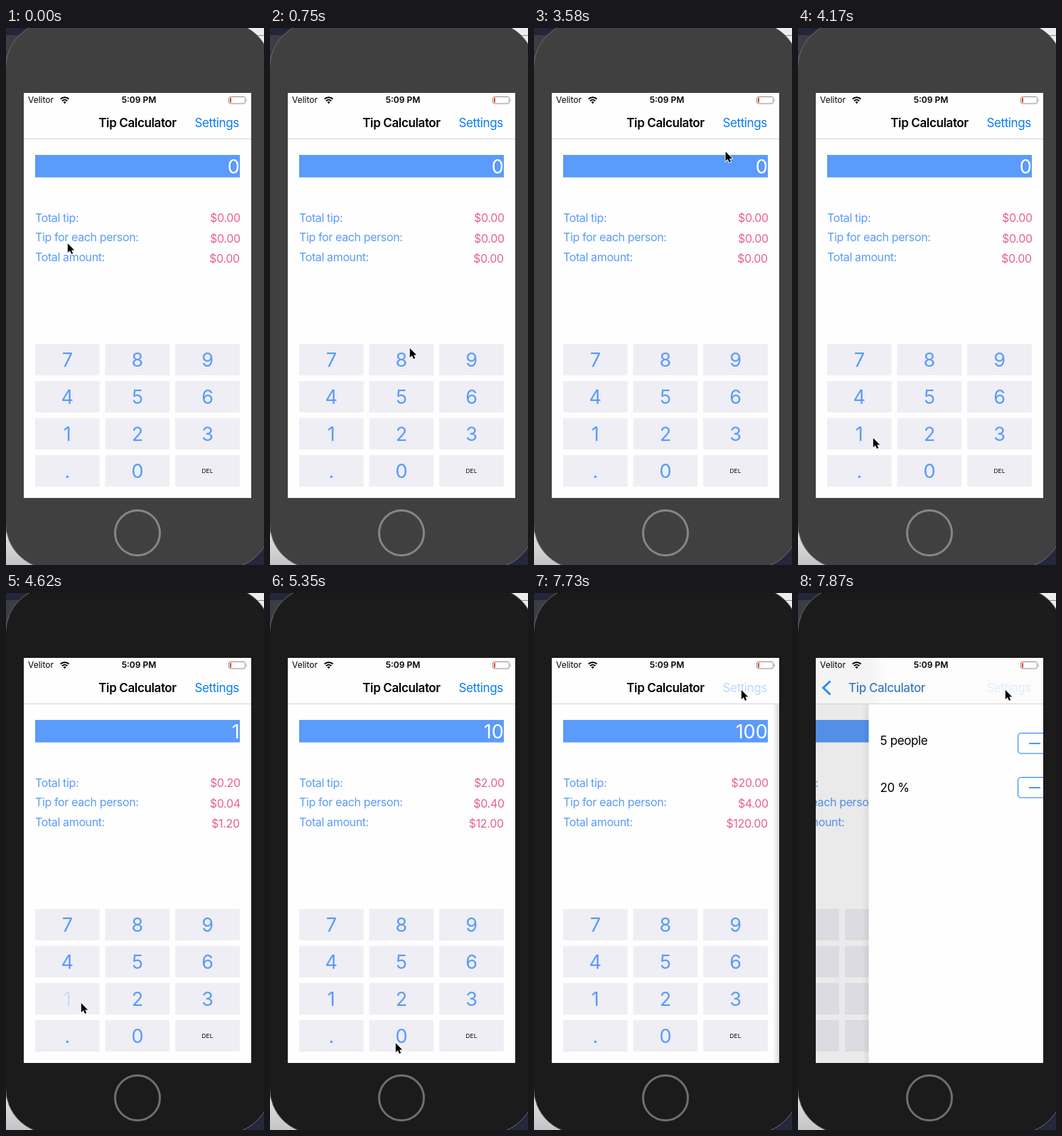
Recreate the animation shown at these times as an HTML page. Size 363x753 px, loop 8 s.

```html
<!DOCTYPE html>
<html lang="en">
<head>
<meta charset="utf-8">
<title>Tip Calculator</title>
<style>
  html, body { margin: 0; width: 100%; height: 100%; overflow: hidden; background: #2a2b3a; }
  svg { display: block; width: 363px; height: 753px; font-family: Inter, "Liberation Sans", sans-serif; }
  .nav { font-size: 17px; letter-spacing: -.38px; }
  .label { font-size: 16px; letter-spacing: -.37px; fill: #5a9bf8; }
  .sum { font-size: 16px; letter-spacing: -.33px; fill: #e6618d; text-anchor: end; }
  .digit { font-size: 27px; fill: #5a9bf8; text-anchor: middle; }
  .word { font-size: 8.2px; letter-spacing: .2px; text-anchor: middle; }
  .bold { font-weight: 600; }
  .mid { text-anchor: middle; }
  .line { fill: none; stroke: #117df8; }
</style>
</head>
<body>
<svg viewBox="0 0 363 753">
  <defs>
    <clipPath id="glass"><rect x="25" y="91" width="320" height="568"/></clipPath>
    <linearGradient id="desk" x2="0" y2="1">
      <stop offset="0" stop-color="#fafafa"/><stop offset="1" stop-color="#c4c4c4"/>
    </linearGradient>
    <linearGradient id="shade">
      <stop offset="0" stop-opacity="0"/><stop offset="1" stop-opacity=".15"/>
    </linearGradient>
    <linearGradient id="blur">
      <stop offset=".24" stop-color="#f4f4f4"/><stop offset=".3" stop-color="#fcfcfc"/>
    </linearGradient>
  </defs>

  <!-- desktop behind the phone -->
  <rect width="363" height="753" fill="#3b3c44"/>
  <rect width="180" height="10" fill="#24263a"/>
  <rect x="180" width="183" height="60" fill="#ececec"/>
  <rect x="180" y="10" width="183" height="1" fill="#8b8b8f"/>
  <rect y="670" width="180" height="83" fill="url(#desk)"/>
  <rect x="180" y="670" width="183" height="83" fill="#25273a"/>

  <rect id="body" x="-.5" y="-8" width="373" height="766" rx="64" stroke="#6c6c6e"/>
  <circle id="home" cx="185" cy="708" r="31.5" fill="none" stroke-width="3"/>

  <g clip-path="url(#glass)">
    <rect x="25" y="91" width="320" height="568" fill="#fefefe"/>

    <g id="calc">
      <rect x="41" y="178" width="288" height="31.5" fill="#5a9bfb"/>
      <text id="bill" x="328.7" y="203.5" font-size="27" fill="#fff" text-anchor="end"></text>
      <text class="label" x="41" y="271.5">Total tip:</text>
      <text class="label" x="41" y="299">Tip for each person:</text>
      <text class="label" x="41" y="326.5">Total amount:</text>
      <text class="sum" id="tip" x="329.7" y="272"></text>
      <text class="sum" id="each" x="329.7" y="301"></text>
      <text class="sum" id="total" x="328.7" y="329"></text>
      <g id="keys"></g>
    </g>
    <rect id="dim" x="25" y="155" width="320" height="504"/>

    <g id="sheet">
      <rect id="edge" x="-9" y="155" width="9" height="504" fill="url(#shade)"/>
      <rect y="155" width="320" height="504" fill="#fefefe"/>
      <text class="nav" x="16" y="213">5 people</text>
      <text class="nav" x="16" y="278.5">20 %</text>
      <g id="steppers"></g>
    </g>

    <rect x="25" y="91" width="320" height="64" fill="#fefefe"/>
    <rect id="haze" x="25" y="91" width="320" height="64" fill="url(#blur)"/>
    <rect x="25" y="155" width="320" height="1" fill="#d3d3d4"/>

    <text x="31" y="105.4" font-size="12">Velitor</text>
    <g fill="none" stroke="#000" stroke-width="2">
      <path d="M76.6 99.6a8.6 8.6 0 0 1 12 0M79 102.2a5.2 5.2 0 0 1 7.2 0"/>
      <path d="M82.6 106.2l-2-2.2a3 3 0 0 1 4 0z" fill="#000" stroke="none"/>
    </g>
    <text class="bold mid" x="187" y="105.4" font-size="12">5:09 PM</text>
    <rect x="313.5" y="96.5" width="23" height="9.5" rx="2" fill="none" stroke="#8c8c8c"/>
    <path d="M338 99.5q1.8 1.7 0 3.5z" fill="#777"/>
    <rect x="315" y="98" width="2" height="6.5" fill="#f2362f"/>

    <path id="back" d="M45.5 123.5L35.5 133L45.5 142.5" fill="none" stroke="#2c8bfa" stroke-width="3"/>
    <text class="nav mid" id="title" y="139">Tip Calculator</text>
    <text class="nav" id="settings" x="265.4" y="139" fill="#087cf6">Settings</text>
  </g>

  <path id="cursor" d="M.8 1V14L3.9 11.2L6 16L8.2 15L6.2 10.4H10.2Z" stroke="#fff" stroke-width="1.6" paint-order="stroke"/>
</svg>

<script>
const LOOP = 8000;
const STEP = 146;                  // the picture advances in steps of this length
const TAPS = [4620, 5204, 5640];   // "1", "0", "0"
const PUSH = 7723;                 // the settings sheet starts to slide in

const $ = id => document.getElementById(id);
const set = (id, attrs) => {
  for (const name in attrs) $(id).setAttribute(name, attrs[name]);
};
const stepsSince = (t, at) => Math.floor((t - at) / STEP);
const ease = p => p * p * (3 - 2 * p);

$('keys').innerHTML = [...'789456123.0', 'DEL'].map((name, i) => {
  const x = 41 + i % 3 * 98.6, y = 443 + Math.floor(i / 3) * 52;
  const word = name.length > 1;
  return `<rect x="${x}" y="${y}" width="90.6" height="44" fill="#eeeef4"/>
    <text id="key${name}" class="${word ? 'word' : 'digit'}" x="${x + 45.3}" y="${y + (word ? 25 : 32)}">${name}</text>`;
}).join('');

$('steppers').innerHTML = [196.5, 258.5].map(y =>
  `<g class="line" transform="translate(210 ${y})">
    <rect width="94" height="28.5" rx="4"/>
    <path d="M47 0v28.5"/>
    <path stroke-width="1.6" d="M15.5 14.5h16M62.5 14.5h16M70.5 6.5v16"/>
  </g>`
).join('');

// Each cursor move starts where the one before ended
const home = { x: 86, y: 301 };
const moves = [
  { at: 150, steps: 5, x: 196, y: 448, bend: .85 },
  { at: 1040, steps: 6, x: 297, y: 130 },
  { at: 3580, steps: 5, x: 105, y: 574, bend: .1 },
  { at: TAPS[0] + STEP, steps: 3, x: 176, y: 630 },
  { at: TAPS[2] + STEP, steps: 4, x: 294, y: 104 },
  { at: 6540, steps: 2, x: 290, y: 144 },
  { at: 7280, steps: 1, x: 291, y: 135 },
];

function cursorAt(t) {
  let spot = home;
  for (const move of moves) {
    if (t < move.at) break;
    const { x, y } = spot, dx = move.x - x, dy = move.y - y;
    const p = ease(Math.min(1, (stepsSince(t, move.at) + 1) / move.steps));
    const bow = 2 * p * (1 - p) * (move.bend || 0);
    spot = { x: x + dx * p - dy * bow, y: y + dy * p + dx * bow };
  }
  return spot;
}

const pressed = (t, at) => stepsSince(t, at) === 0;
const money = n => '$' + n.toFixed(2);

function draw(t) {
  const typed = TAPS.filter(at => t >= at).length;
  const bill = typed ? 10 ** (typed - 1) : 0;
  $('bill').textContent = bill;
  $('tip').textContent = money(bill * .2);
  $('each').textContent = money(bill * .2 / 5);
  $('total').textContent = money(bill * 1.2);

  set('body', { fill: typed ? '#1b1b1b' : '#404040' });
  set('home', { stroke: typed ? '#6f6f6f' : '#868686' });
  set('key1', { opacity: pressed(t, TAPS[0]) ? .2 : 1 });
  set('key0', { opacity: TAPS.slice(1).some(at => pressed(t, at)) ? .2 : 1 });

  const opening = t >= PUSH;
  const push = opening ? 1 - .233 ** stepsSince(t, PUSH) : 0;
  const moved = push > 0;
  set('calc', { transform: `translate(${-96 * push})` });
  set('dim', { opacity: .1 * push });
  set('sheet', {
    transform: `translate(${25 + 320 * (1 - push)})`,
    visibility: opening ? 'visible' : 'hidden',
  });
  set('edge', { opacity: 1 - .7 * push });
  set('haze', { opacity: +moved });
  set('back', { opacity: +moved });
  set('settings', { opacity: opening ? .27 * (1 - .8 * push) : 1 });
  set('title', {
    x: moved ? 125 : 185,
    fill: moved ? '#3c7dbc' : '#000',
    'font-weight': moved ? 500 : 600,
  });

  const { x, y } = cursorAt(t);
  set('cursor', { transform: `translate(${x} ${y})` });
}

const start = performance.now();
function tick() {
  draw((performance.now() - start) % LOOP);
  requestAnimationFrame(tick);
}
tick();
</script>
</body>
</html>
```
